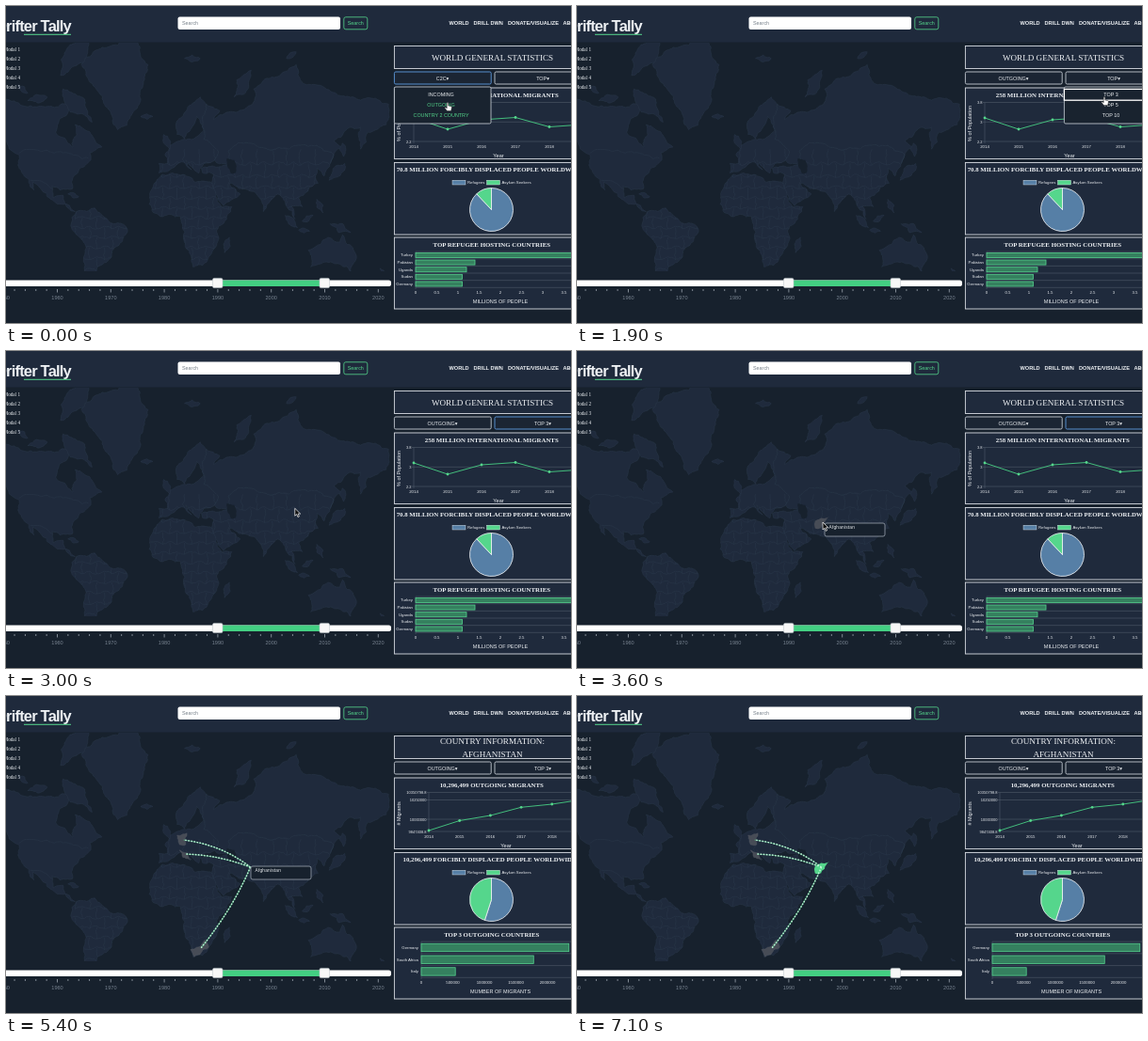
Animation of 600 by 337 pixels, one loop 7200 ms. Source, as an HTML page:

```html
<!DOCTYPE html>
<html lang="en">
<head>
<meta charset="utf-8">
<title>Migration dashboard</title>
<style>
html, body { margin: 0; width: 100%; height: 100%; overflow: hidden; background: #17212d; }
svg { display: block; width: 600px; height: 337px; }
text { font-family: "Liberation Sans", Arial, sans-serif; fill: #eef1f4; }
.serif { font-family: "Liberation Serif", Times, serif; }
.logo { font-weight: 700; letter-spacing: -.8px; }
.land { fill: #1f2a3c; stroke: #2a384a; stroke-width: .5; stroke-linejoin: round; }
.border { fill: none; stroke: #2b394b; stroke-width: .5; }
.hot { fill: #474c56; stroke: #5a5f69; stroke-width: .4; }
.panel { fill: #1f2a3c; stroke: #d5dae0; stroke-width: .9; }
.menu { fill: #19232f; stroke: #cfd5dc; stroke-width: .8; }
.grid { stroke: #566270; stroke-width: .5; }
.bar { fill: #35805f; stroke: #55d08d; stroke-width: .8; }
.slice { stroke: #f2f4f6; stroke-width: .8; }
.route { fill: none; stroke: #55d68c; stroke-width: 1.2; stroke-opacity: .55; }
.dots { fill: none; stroke: #c4f5db; stroke-width: 1.5; stroke-dasharray: 1.5 1.6; }
</style>
</head>
<body>
<svg id="stage" viewBox="0 0 600 337"></svg>
<script>
const LOOP = 7200, GREEN = '#55d68c', BLUE = '#567fa6';
const stage = document.getElementById('stage');
const $ = id => document.getElementById(id);

// ---- drawing helpers
const text = (x, y, s, size = 5.4, extra = '') =>
  `<text x="${x}" y="${y}" font-size="${size}" ${extra}>${s}</text>`;
const mid = (x, y, s, size, extra = '') => text(x, y, s, size, `text-anchor="middle" ${extra}`);
const end = (x, y, s, size, extra = '') => text(x, y, s, size, `text-anchor="end" ${extra}`);
const rect = (x, y, w, h, extra = '') =>
  `<rect x="${x}" y="${y}" width="${w}" height="${h}" ${extra}/>`;
const line = (x1, y1, x2, y2, extra = 'class="grid"') =>
  `<line x1="${x1}" y1="${y1}" x2="${x2}" y2="${y2}" ${extra}/>`;
const group = (id, body) => `<g id="${id}">${body}</g>`;
const repeat = (n, f) => Array.from({ length: n }, (_, i) => f(i)).join('');
const heading = (y, s) => mid(515.8, y, s, 6.85, 'class="serif" font-weight="700"');
const title = (y, s) => mid(516.5, y, s, 9.15, 'class="serif"');

// ---- world map: a few longitude/latitude key points in Mercator, roughened into coasts
const project = ([lon, lat]) =>
  [174 + 1.29 * lon, 229 - 74 * Math.log(Math.tan(Math.PI / 4 + lat * Math.PI / 360))];
const parse = keys => keys.split(' ').map(p => project(p.split(',').map(Number)));
// The offset depends on the midpoint only, so neighbours share the same border.
function rough(a, b) {
  const len = Math.hypot(b[0] - a[0], b[1] - a[1]);
  if (len < 3) return [a];
  const x = (a[0] + b[0]) / 2, y = (a[1] + b[1]) / 2, sway = Math.min(.13 * len, 3);
  const m = [x + sway * Math.sin(7 * x + 3 * y), y + sway * Math.cos(3 * x + 8 * y)];
  return [...rough(a, m), ...rough(m, b)];
}
const toPath = pts => 'M' + pts.map(p => p.map(v => v.toFixed(1)).join(' ')).join('L');
const coast = pts => toPath(pts.flatMap((p, i) => rough(p, pts[(i + 1) % pts.length]))) + 'Z';
const shape = (pts, cls = 'land') => `<path class="${cls}" d="${coast(pts)}"/>`;
// A slim island lying between two tips.
function island(keys) {
  const [[x1, y1], [x2, y2]] = parse(keys), w = .22, x = (x1 + x2) / 2, y = (y1 + y2) / 2;
  const dx = (y2 - y1) * w, dy = (x1 - x2) * w;
  return [[x1, y1], [x + dx, y + dy], [x2, y2], [x - dx, y - dy]];
}

const northAmerica = parse('-141,70 -95,68 -82,69 -94,59 -80,52 -78,62 -70,60 -56,52 -66,49 -65,45 -81,31 -80,26 -97,28 -96,19 -88,21 -84,11 -78,8 -95,16 -113,31 -112,25 -124,40 -124,48 -141,60');
const southAmerica = parse('-77,8 -62,11 -50,0 -35,-6 -39,-16 -48,-26 -62,-39 -65,-43 -74,-43 -70,-18 -81,-5');
const africa = parse('-6,36 11,36 20,31 33,31 43,12 51,12 40,-4 40,-15 27,-34 19,-35 12,-17 9,4 -8,4 -17,14 -16,24');
const europe = parse('-9,37 -9,43 -2,43 -4,48 8,55 22,57 28,60 28,56 40,50 37,45 28,43 24,37 13,45 18,39 10,44 0,39');
const nordics = parse('6,58 5,62 25,71 30,69 28,60 22,65 17,60 12,56');
const russia = parse('28,60 30,69 41,67 36,64 68,69 69,73 104,78 113,74 180,69 178,62 163,59 157,51 157,61 135,55 141,52 132,43 135,48 121,53 98,51 80,51 61,54 48,50 47,42 37,45 40,50 28,56');
const asia = parse('47,42 48,50 61,54 80,51 98,51 121,53 135,48 132,43 127,35 121,40 122,30 110,21 106,19 109,12 100,13 103,2 94,17 89,22 80,14 77,8 72,21 57,26 49,30 58,22 44,13 35,29 36,36 27,37 26,40 41,41');
const australia = parse('114,-23 130,-13 140,-17 142,-11 153,-26 149,-38 131,-32 116,-35');
const greenland = parse('-73,78 -30,83 -18,78 -24,70 -43,60 -54,69');
const islands = ['-88,73 -64,63', '-117,70 -101,71', '-90,76 -66,82', '-125,74 -117,72', '-24,65 -14,65', '12,79 25,79',
  '-5,58 0,51', '-84,22 -75,20', '49,-13 45,-25', '131,32 144,43', '121,18 126,7', '109,0 118,5',
  '95,5 105,-5', '106,-7 115,-8', '132,-2 149,-9', '173,-36 177,-40'].map(island);
const russianIsles = ['53,71 67,77', '96,79 104,80', '142,54 143,47'].map(island);
const afghanistan = parse('61,35 66,37 73,38 69,33 66,30 61,30');
const hosts = [parse('6,53 14,54 13,48 8,48'), island('8,45 17,39'), parse('17,-30 29,-23 32,-28 20,-35')];
const routes = ['M259.5 182Q229 158 188.5 153', 'M259.5 182Q226 169 191 168', 'M259.5 182Q241 226 207 268'];

// Country borders: a staggered lattice, bent like the coasts.
const bent = (a, b) => toPath([...rough(project(a), project(b)), project(b)]);
let borders = '';
for (let row = 0; row < 11; row++) {
  const lat = -38 + 8 * row;
  for (let lon = -84 + row % 2 * 6; lon < 126; lon += 12)
    borders += bent([lon, lat], [lon + 6, lat + 2]) + bent([lon + 6, lat + 2], [lon + 12, lat]) + bent([lon, lat], [lon, lat + 9]);
}
const divided = [southAmerica, africa, europe, asia];
const world = `<clipPath id="mapClip">${rect(0, 39, 410, 243)}</clipPath>
  <clipPath id="divided">${divided.map(p => shape(p)).join('')}</clipPath><g clip-path="url(#mapClip)">`
  + [...divided, northAmerica, nordics, russia, australia, greenland, ...islands, ...russianIsles].map(p => shape(p)).join('')
  + `<path class="border" clip-path="url(#divided)" d="${borders}"/>`
  + `<path class="border" d="${bent([-124, 49], [-95, 49])}${bent([-95, 49], [-67, 46])}${bent([-115, 32], [-97, 26])}"/>`
  + `<path fill="#17212d" d="${coast(parse('47,46 53,45 54,37 50,37'))}"/>`
  + group('russia', [russia, ...russianIsles].map(p => shape(p, 'hot')).join(''))
  + group('hosts', hosts.map(p => shape(p, 'hot')).join(''))
  + group('afghan', shape(afghanistan, ''))
  + routes.map((d, i) => `<mask id="reveal${i}" maskUnits="userSpaceOnUse" x="0" y="0" width="410" height="290">
      <path class="reveal" d="${d}" fill="none" stroke="#fff" stroke-width="5" pathLength="1" stroke-dasharray="1 1"/></mask>
      <g mask="url(#reveal${i})"><path class="route" d="${d}"/><path class="dots" d="${d}"/></g>`).join('')
  + '</g>';

// ---- page furniture
const header = rect(0, 0, 600, 38.5, 'fill="#1f2a3c"')
  + end(69, 26.5, 'Drifter Tally', 16.5, 'class="logo"') + line(19, 30.3, 69, 30.3, `stroke="${GREEN}"`)
  + rect(182.5, 11.5, 172.5, 13.5, 'rx="2" fill="#fff"') + text(187, 20.2, 'Search', 5.4, 'style="fill:#77808a"')
  + rect(358.8, 11.8, 25, 13, `rx="2" fill="none" stroke="${GREEN}" stroke-width=".8"`) + mid(371.3, 20.2, 'Search', 5.4, `style="fill:${GREEN}"`)
  + [[470.5, 'WORLD'], [496.5, 'DRILL DWN'], [533, 'DONATE/VISUALIZE'], [591.5, 'ABOUT']]
    .map(([x, s]) => text(x, 20.2, s, 5.6, 'font-weight="700"')).join('')
  + repeat(5, i => end(15, 48 + 10 * i, 'Modal ' + (i + 1), 5.2, 'class="serif"'));

const slider = rect(-5, 291.6, 414, 6.4, 'rx="2.5" fill="#fff"') + rect(225, 291.6, 113, 6.4, 'fill="#43cf82"')
  + [219.5, 333].map(x => rect(x, 289.4, 10.5, 10.2, 'rx="1.5" fill="#f7f7f7" stroke="#c3c9cf" stroke-width=".6"')).join('')
  + repeat(36, i => {
    const x = -2.3 + i * 11.36, decade = i % 5 === 0;
    return line(x, 301, x, decade ? 304.5 : 303, 'stroke="#aeb6c0" stroke-width=".7"')
      + (decade ? mid(x, 312, 1950 + 2 * i, 5.6, 'style="fill:#77828f"') : '');
  });

const panels = [[42.5, 24], [87, 75.5], [166.5, 76.5], [246, 76]].map(([y, h]) => rect(412.4, y, 200, h, 'class="panel"')).join('');
const button = (id, x, w) => rect(x, 70, w, 13, `id="${id}Box" rx="1.5" fill="#1b2533" stroke-width=".9"`) + group(id + 'Label', '');

// ---- statistics panels
const lineChart = (left, step, ys, ticks, label, k) => {
  const pts = ys.map((y, i) => [left + i * step, 144 + (y - 144) * k]);
  return ticks.map(([y, s]) => line(left - 2, y, 600, y) + end(left - 2.5, y + 1.6, s, 4)).join('')
    + line(left, 102.5, left, 146)
    + `<polyline points="${pts.join(' ')}" fill="none" stroke="#43bd7c"/>`
    + pts.map(([x, y], i) => `<circle cx="${x}" cy="${y}" r="1.4" fill="${GREEN}"/>` + mid(x, 151.3, 2014 + i, 4.3)).join('')
    + mid(0, 0, label, 5.4, 'transform="translate(419 125) rotate(-90)"') + mid(left / 2 + 306.5, 161, 'Year', 5.6);
};
const pie = (share, k) => {
  const at = turn => `${515.5 + 23 * Math.sin(turn * 2 * Math.PI)} ${216.5 - 23 * Math.cos(turn * 2 * Math.PI)}`;
  const slice = (a, b, color) => `<path class="slice" fill="${color}" d="M515.5 216.5L${at(a)}A23 23 0 ${b - a > .5 ? 1 : 0} 1 ${at(b)}Z"/>`;
  return slice(0, share * k, BLUE) + slice(share * k, k, GREEN);
};
const legend = [[474, BLUE, 'Refugees'], [510.5, GREEN, 'Asylum Seekers']].map(([x, color, s]) =>
  rect(x, 185.2, 14, 4.8, `fill="${color}" stroke="#e6eaee" stroke-width=".4"`) + text(x + 16, 189.4, s, 4.3)).join('');
const barChart = (left, bars, unit, step, label, k) => {
  const pitch = 38.2 / bars.length, h = pitch * .66;
  return repeat(bars.length + 1, i => line(left, 261.1 + i * pitch, 600, 261.1 + i * pitch))
    + line(left, 261.1, left, 301)
    + repeat(8, i => mid(left + i * unit, 306, i * step, 4.3))
    + bars.map(([s, value], i) => {
      const y = 261.1 + i * pitch + (pitch - h) / 2;
      return rect(left, y, value / step * unit * k, h, 'class="bar"') + end(left - 3, y + h / 2 + 1.5, s, 4.3);
    }).join('')
    + mid(525, 315.6, label, 5.5);
};
const displaced = (x, count) =>
  text(x, 176.4, count + ' FORCIBLY DISPLACED PEOPLE WORLDWIDE', 6.8, 'class="serif" font-weight="700"');

const worldStats = title(58, 'WORLD GENERAL STATISTICS') + heading(97, '258 MILLION INTERNATIONAL MIGRANTS')
  + lineChart(433, 36, [119, 131, 121, 118.5, 128.5, 126], [[102.5, '3.8'], [123.3, '3'], [144, '2.2']], '% of Population', 1)
  + displaced(414.7, '70.8 MILLION') + legend + pie(.88, .99999) + heading(255.8, 'TOP REFUGEE HOSTING COUNTRIES')
  + barChart(435, [['Turkey', 3.9], ['Pakistan', 1.4], ['Uganda', 1.2], ['Sudan', 1.1], ['Germany', 1.1]],
    22.5, .5, 'MILLIONS OF PEOPLE', 1);
const countryStats = k => title(51.2, 'COUNTRY INFORMATION:') + title(64.6, 'AFGHANISTAN')
  + heading(97, '10,296,499 OUTGOING MIGRANTS')
  + lineChart(449, 32.7, [143, 132.5, 127, 118.3, 115, 110],
    [[102.5, '10350798.8'], [110.5, '10250000'], [131, '10000000'], [144, '9847408.8']], '# Migrants', k)
  + displaced(421.5, '10,296,499') + legend + pie(.55, k * .99999) + heading(255.8, 'TOP 3 OUTGOING COUNTRIES')
  + barChart(441, [['Germany', 2.34e6], ['South Africa', 1.78e6], ['Italy', 5.4e5]], 33.5, 5e5, 'MUMBER OF MIGRANTS', k);

const modeMenu = rect(412.4, 86, 102.6, 39, 'class="menu" rx="1.5"') + mid(462, 96.2, 'INCOMING')
  + mid(462, 107.2, 'OUTGOING', 5.4, `style="fill:${GREEN}"`) + mid(462, 118.2, 'COUNTRY 2 COUNTRY', 5.4, `style="fill:${GREEN}"`);
const topMenu = rect(517.4, 86, 95, 39, 'class="menu" rx="1.5"')
  + rect(517.4, 88.4, 95, 11.8, 'id="topFocus" fill="none" stroke="#fff" stroke-width="1.3"')
  + [3, 5, 10].map((n, i) => mid(567, 96.2 + 11 * i, 'TOP ' + n)).join('');
const tip = rect(0, 0, 64, 14, 'rx="2" fill="#17212d" stroke="#9aa3ae" stroke-width=".8"') + text(4.5, 5.8, '', 4.8, 'id="tipText" letter-spacing=".2"');
const arrow = '<path d="M0 0v8l1.9-1.7 1.3 3 1.4-.6-1.3-2.9h2.6z" fill="#111" stroke="#fff" stroke-width=".7"/>';
const hand = '<path d="M-.8 0q.8-1 1.6 0v3l3 .7q.8.3.6 1.3l-.8 3.6h-4.2l-2.5-3.4q.4-1 1.4-.2l.9.8z" fill="#fff" stroke="#222" stroke-width=".5"/>';

stage.innerHTML = rect(0, 0, 600, 337, 'fill="#17212d"') + world + header + slider + panels
  + button('mode', 412.4, 102.8) + button('top', 519, 94) + group('worldStats', worldStats) + group('countryStats', '')
  + group('modeMenu', modeMenu) + group('topMenu', topMenu) + group('tip', tip) + group('arrow', arrow) + group('hand', hand);

// ---- motion
const clamp = u => Math.min(1, Math.max(0, u));
const ease = u => u < .5 ? 2 * u * u : 1 - 2 * (1 - u) ** 2;
const moves = [[300, 1000, 562, 77], [1250, 1700, 560, 97], [2000, 2600, 320, 163], [2800, 3400, 261, 182]];
const pointer = t => moves.reduce(([x, y], [from, to, toX, toY]) => {
  const u = ease(clamp((t - from) / (to - from)));
  return [x + (toX - x) * u, y + (toY - y) * u];
}, [469, 103]);
const show = (id, on) => $(id).setAttribute('display', on ? 'inline' : 'none');
const fill = (id, html) => { const el = $(id); if (el.shown !== html) el.innerHTML = el.shown = html; };
const move = (id, x, y) => $(id).setAttribute('transform', `translate(${x.toFixed(2)} ${y.toFixed(2)})`);
function setButton(id, x, label, focused) {
  fill(id + 'Label', mid(x, 78.6, label + '<tspan font-family="DejaVu Sans, sans-serif">▾</tspan>'));
  $(id + 'Box').setAttribute('stroke', focused ? '#5e9be0' : '#c3cad2');
}

function render(t) {
  const [x, y] = pointer(t), loaded = t >= 4700, between = (a, b) => t >= a && t < b;
  const grown = 1 - (1 - clamp((t - 4700) / 700)) ** 4;

  setButton('mode', 463.5, t < 300 ? 'C2C' : 'OUTGOING', t < 900);
  setButton('top', 570, t < 2000 ? 'TOP' : 'TOP 3', between(1100, 1700) || between(2000, 3900));
  show('modeMenu', t < 300);
  show('topMenu', between(1200, 2000));
  show('topFocus', t >= 1700);

  const overRussia = between(2400, 2950), overAfghan = between(3300, 5700);
  show('russia', overRussia);
  show('tip', overRussia || overAfghan);
  $('tipText').textContent = overRussia ? 'Russia' : 'Afghanistan';
  if (overRussia) move('tip', x + 8, y - 14);
  else move('tip', x + (loaded ? -1 : 2), y + (loaded ? -1 : 1));

  show('afghan', between(3300, 4700) || t >= 5700);
  $('afghan').setAttribute('fill', loaded ? GREEN : '#474c56');
  show('hosts', loaded);
  document.querySelectorAll('.reveal').forEach(p => p.setAttribute('stroke-dashoffset', 1 - grown));

  show('worldStats', !loaded);
  show('countryStats', loaded);
  if (loaded) fill('countryStats', countryStats(grown));

  const clickable = t < 2050;
  show('hand', clickable);
  show('arrow', !clickable && !loaded);
  move('hand', x, y);
  move('arrow', x, y);
}

const start = performance.now();
function tick() {
  render((performance.now() - start) % LOOP);
  requestAnimationFrame(tick);
}
tick();
</script>
</body>
</html>
```
